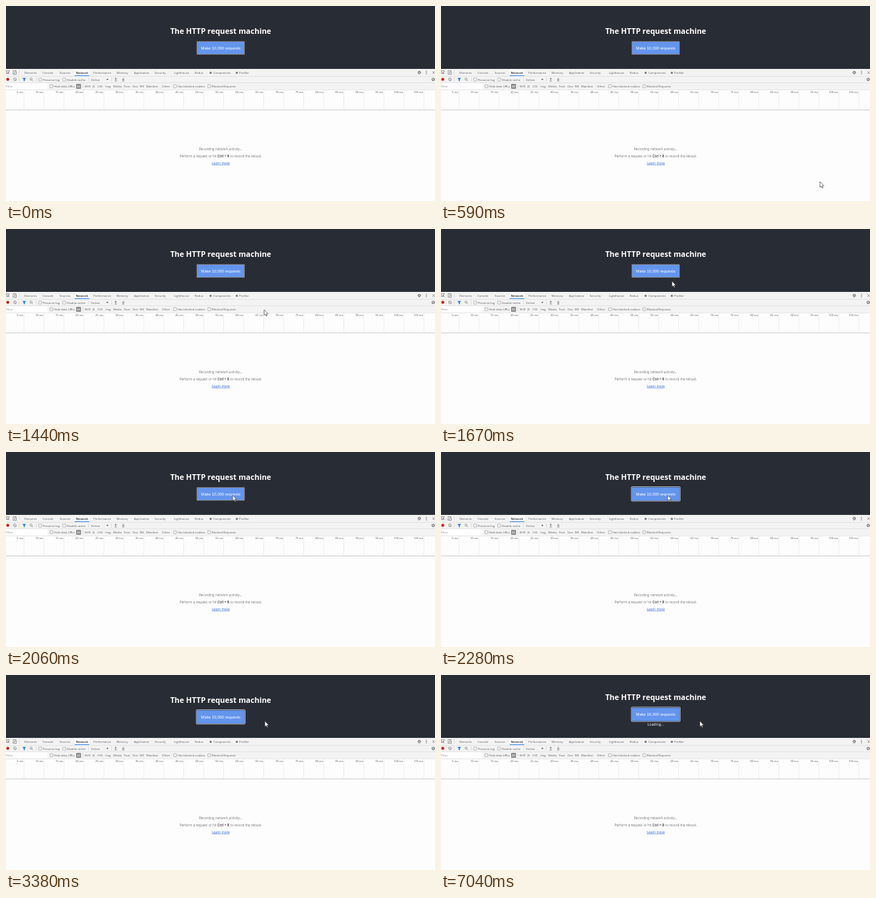
An HTML page that plays this animation: 600 by 273 pixels, repeating every 8000 ms.

```html
<!DOCTYPE html>
<html lang="en">
<head>
<meta charset="utf-8">
<title>The HTTP request machine</title>
<style>
  html, body { margin: 0; width: 100%; height: 100%; overflow: hidden; background: #fdfdfd; }
  svg { display: block; width: 100vw; height: 100vh; }
  text { font-family: "Open Sans", "Noto Sans", sans-serif; font-size: 4.1px; fill: #5c5f63; }
  .mid { text-anchor: middle; }
  .title { font-size: 10.6px; font-weight: 700; fill: #fff; }
  .label { font-family: "Liberation Sans", Arial, sans-serif; font-size: 5.56px; fill: #fff; }
  .loading { font-size: 5.2px; fill: #fff; }
  .note { font-size: 4.63px; fill: #777; }
  .note tspan { font-weight: 700; fill: #555; }
  .line { fill: none; stroke: #6e6e6e; stroke-width: .6; }
</style>
</head>
<body>
<svg viewBox="0 0 600 273" preserveAspectRatio="none">
  <rect width="600" height="273" fill="#fdfdfd"/>
  <rect width="600" height="88" fill="#282c34"/>
  <g id="hero">
    <text class="title mid" x="300.3" y="39">The HTTP request machine</text>
    <g id="button">
      <rect id="ring" x="266.2" y="48.7" width="68.2" height="20" rx="1" fill="#101010" stroke="#fff" stroke-width=".7"/>
      <rect id="face" x="267" y="49.8" width="66.4" height="18" fill="#6495ed" stroke="#a98f72" stroke-width=".6"/>
      <text class="label mid" x="300.3" y="60.9">Make 10,000 requests</text>
    </g>
  </g>
  <text id="loading" class="loading mid" x="300.3" y="71">Loading...</text>

  <rect y="88" width="600" height="29" fill="#f3f3f3"/>
  <g id="panel"></g>

  <text class="note mid" x="300.2" y="202.3">Recording network activity...</text>
  <text class="note mid" x="300.2" y="212">Perform a request or hit <tspan>Ctrl + R</tspan> to record the reload.</text>
  <text class="note mid" x="300.4" y="221.6" style="fill:#2a62d8;text-decoration:underline">Learn more</text>

  <path id="cursor" d="M0 0V8L1.9 6.2 3.1 9 4.3 8.5 3.1 5.8H5.6Z" fill="#fff" stroke="#222" stroke-width=".55"/>
</svg>
<script>
const NS = 'http://www.w3.org/2000/svg';
const get = id => document.getElementById(id);
const panel = get('panel');

function add(tag, attrs, content = '') {
  const node = document.createElementNS(NS, tag);
  for (const key in attrs) node.setAttribute(key, attrs[key]);
  node.textContent = content;
  panel.append(node);
}
const text = (x, y, content, extra) => add('text', { x, y, ...extra }, content);
const rect = (x, y, width, height, fill) => add('rect', { x, y, width, height, fill });
const icon = (d, stroke = '#6e6e6e') => add('path', { d, class: 'line', style: `stroke:${stroke}` });
const dot = (cx, cy, r, fill) => add('circle', { cx, cy, r, fill });
const divider = (x, y) => rect(x, y - 3, .5, 6, '#ccc');

function checkbox(x, y, label) {
  add('rect', { x, y: y - 2, width: 4, height: 4, rx: .6, fill: '#fff', stroke: '#777', 'stroke-width': .5 });
  text(x + 5.7, y + 1.6, label);
}

function gear(x, y) {
  add('circle', { cx: x, cy: y, r: 1.7, class: 'line', style: 'stroke-width:1.3;stroke-dasharray:.9 .43' });
  add('circle', { cx: x, cy: y, r: 1.3, class: 'line' });
}

function drawTabs() {
  rect(96, 88, 20.5, 10, '#fafafa');
  rect(96, 97.2, 20.5, .8, '#1a73e8');
  icon('M4 94.5H.5V90.5H4.5V92M2.5 92.5L5 95.3M2.5 92.5V94.5M2.5 92.5H4.5');
  icon('M10 95.5V90.5H14V92M12 92.3H14.5V95.8H12ZM9.5 95.5H11.5');
  divider(18, 93);
  const tabs = { Elements: 25.5, Console: 51, Sources: 75, Performance: 122.3, Memory: 154.5,
    Application: 179, Security: 208, Lighthouse: 235, Redux: 264, Components: 290, Profiler: 326 };
  for (const name in tabs) text(tabs[name], 95.1, name);
  text(97.7, 95.1, 'Network', { style: 'fill:#222;font-weight:600' });
  dot(286.2, 93.5, 1.5, '#777');
  dot(322.8, 93.5, 1.5, '#777');
  gear(578, 93.2);
  for (const y of [91.3, 93.2, 95.1]) dot(588, y, .6, '#555');
  icon('M596.5 91.5L599.5 95M599.5 91.5L596.5 95');
}

function drawControls() {
  dot(2.5, 102.7, 2.1, '#c5221f');
  add('circle', { cx: 12.5, cy: 102.7, r: 2, class: 'line' });
  icon('M11.1 101.3L13.9 104.1');
  divider(18, 103);
  add('path', { d: 'M23 100.8H28L26.2 103V105.3H24.8V103Z', fill: '#1a73e8' });
  add('circle', { cx: 35, cy: 102.3, r: 1.5, class: 'line' });
  icon('M36 103.4L37.8 105.2');
  divider(42, 103);
  checkbox(45.8, 103, 'Preserve log');
  checkbox(79.3, 103, 'Disable cache');
  divider(115, 103);
  text(118.8, 104.6, 'Online');
  add('path', { d: 'M140.2 102H143.4L141.8 104Z', fill: '#666' });
  divider(147, 103);
  icon('M153.5 104V100.8M152 102.3L153.5 100.8 155 102.3M151.8 105H155.2', '#555');
  icon('M164 100.5V103.8M162.5 102.3L164 103.8 165.5 102.3M162.3 105H165.7', '#555');
  gear(597.5, 102.8);
}

function drawFilters() {
  rect(0, 108, 58, 8.6, '#fff');
  text(0, 114, 'Filter', { style: 'fill:#888' });
  checkbox(61.5, 112.3, 'Hide data URLs');
  add('rect', { x: 98, y: 109, width: 7, height: 7, rx: 1.2, fill: '#8c8c8c' });
  text(99.3, 113.9, 'All', { style: 'fill:#fff' });
  const kinds = { XHR: 110, JS: 121, CSS: 128, Img: 139.3, Media: 150, Font: 165,
    Doc: 177.3, WS: 187, Manifest: 196, Other: 218.3 };
  for (const name in kinds) text(kinds[name], 113.9, name);
  divider(107.5, 112.5);
  checkbox(234.3, 112.3, 'Has blocked cookies');
  checkbox(282.3, 112.3, 'Blocked Requests');
}

function drawRuler() {
  for (let i = 1; i <= 21; i++) {
    const x = 24.8 + 27.97 * (i - 1);
    rect(x, 117, .5, 28.5, '#e2e2e2');
    text(x - .8, 122.3, `${i * 5} ms`, { 'text-anchor': 'end', style: 'font-size:3.9px' });
  }
  for (const y of [88, 98, 107.2, 117]) rect(0, y, 600, .5, '#d6d6d6');
  rect(0, 145.3, 600, .7, '#bdbdbd');
}

drawTabs();
drawControls();
drawFilters();
drawRuler();

// The pointer was sampled at a fixed rate, so it jumps from point to point.
const LOOP = 8000, SAMPLE = 77;
const moves = [
  [440, [[588, 265], [562, 262], [530, 246], [494, 222], [474, 209]]],
  [1050, [[398.5, 153], [377, 132], [369, 124]]],
  [1440, [[361, 113], [342, 92], [330, 80], [323, 73], [320, 69], [318.5, 66], [317.5, 63], [317, 61.5], [317, 60.5]]],
  [2920, [[334, 63], [345, 64], [352, 64.3], [357, 64.5], [360, 64.5], [361.5, 64.5], [362, 64.5]]]
];

function pointerAt(t) {
  const move = moves.filter(([start]) => t >= start).pop();
  if (!move) return null;
  const [start, points] = move;
  return points[Math.min(points.length - 1, Math.floor((t - start) / SAMPLE + .05))];
}

function render(t) {
  const point = pointerAt(t);
  const focused = t >= 2280, loading = t >= 7040;
  get('cursor').style.display = point ? '' : 'none';
  if (point) get('cursor').setAttribute('transform', `translate(${point})`);
  get('ring').style.display = focused ? '' : 'none';
  get('face').style.stroke = focused ? '#6495ed' : '';
  get('hero').setAttribute('transform', `translate(0 ${loading ? -3.7 : 0})`);
  get('loading').style.display = loading ? '' : 'none';
}

const begin = performance.now();
function tick() {
  render((performance.now() - begin) % LOOP);
  requestAnimationFrame(tick);
}
tick();
</script>
</body>
</html>
```
